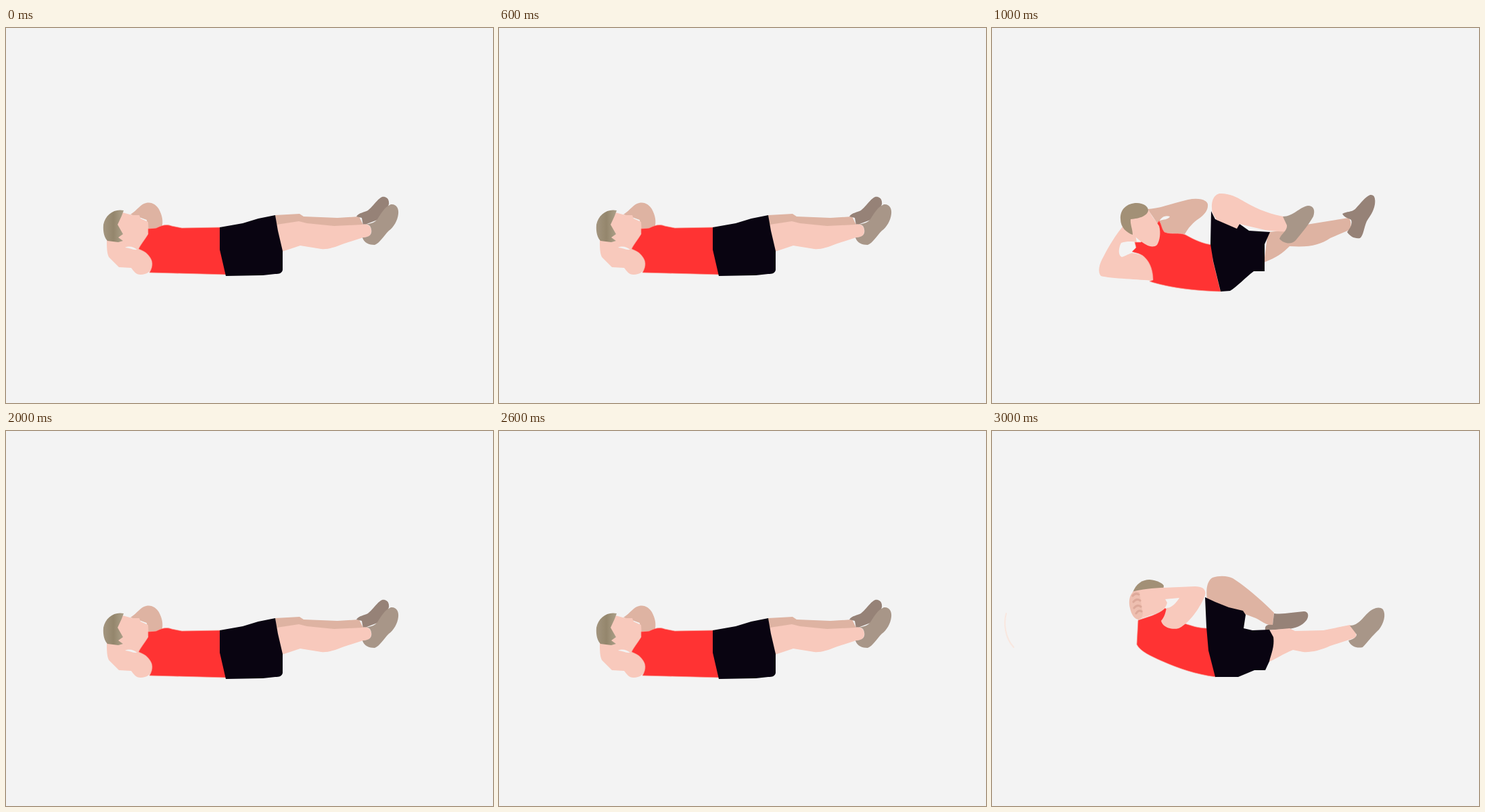
An HTML page for the animation above (4 s loop, 720x555 px).

```html
<!DOCTYPE html>
<html lang="en">
<head>
<meta charset="utf-8">
<title>Bicycle crunch</title>
<style>
  html, body { margin: 0; width: 100%; height: 100%; overflow: hidden; background: #f3f3f3; }
  svg { display: block; width: 100%; height: 100%; }
  g { display: none; }
  g.on { display: inline; }
  .skin { fill: #f8c9bc; }
  .far { fill: #deb3a2; }
  .shirt { fill: #f33; stroke: #f9a397; stroke-width: .7; }
  .shorts { fill: #090411; }
  .hair { fill: #a29076; }
  .shoe { fill: #a89688; }
  .farshoe { fill: #968277; }
  .gap { fill: #f3f3f3; }
  .line { fill: none; stroke: #dda99a; stroke-width: 3; stroke-linecap: round; }
  .trace { fill: none; stroke: #f9e7df; stroke-width: 2; stroke-linecap: round; }
</style>
</head>
<body>
<svg viewBox="0 0 720 555">
  <defs>
    <linearGradient id="fade">
      <stop offset="0" stop-color="#a3957f"/>
      <stop offset=".5" stop-color="#94866c"/>
      <stop offset="1" stop-color="#ada18a"/>
    </linearGradient>
  </defs>

  <g id="flat" class="on">
    <path class="far" d="M184 276C195 269 198 261 207 259C216 257 222 262 226 268C231 277 233 287 230 296L210 297L208 284L197 280Z"/>
    <path class="skin" d="M172 273L187 277L197 277L199 282L210 287C211 298 211 305 206 311L196 328L190 324L168 319L160 300Z"/>
    <path class="skin" d="M149 313L168 317L190 322L197 327C208 330 215 340 216 350C216 360 208 365 199 365C192 365 189 360 185 355L167 354L152 339C149 333 149 323 149 313Z"/>
    <path class="gap" d="M176 325C182 322 189 324 194 328C188 329 182 325 176 325Z"/>
    <path fill="url(#fade)" d="M174 270C160 267 147 276 144 291C143 303 146 311 150 315L166 317L173 315L166 310L173 305L165 291L171 278Z"/>
    <path class="far" d="M398 277L434 275L440 279L490 281L522 279L529 293L480 296L430 292L400 296Z"/>
    <path class="farshoe" d="M518 279C522 273 530 273 535 270C543 264 549 253 556 250C563 249 567 254 566 261C562 271 555 280 549 284L528 292L526 281Z"/>
    <path class="skin" d="M400 291L433 286L445 289L485 293L526 291C531 289 540 291 540 300C540 308 535 310 528 310L500 319C485 325 475 328 466 327L435 322L408 331Z"/>
    <path class="shoe" d="M528 291C540 290 545 288 549 283C556 272 560 265 569 261C577 260 581 267 580 275C579 285 573 295 566 300C558 308 552 319 545 321C537 321 529 318 527 310C540 310 541 303 540 298C539 291 534 290 528 291Z"/>
    <path class="shirt" d="M210 297L222 296C230 292 237 290 245 293L260 296L317 295L318 330L326 365L290 364L212 362C218 352 217 344 211 337C207 331 200 329 196 327C198 322 206 312 210 305Z"/>
    <path class="shorts" d="M316 295L350 289L373 282L398 277L402 300L409 330L409 358C408 363 404 364 398 364L380 366L325 367L316 328Z"/>
  </g>

  <g id="left">
    <path class="far" d="M230 268C245 268 265 260 290 254C305 251 318 254 319 261C320 270 313 277 306 282C297 288 290 296 285 305L253 303L241 284Z"/>
    <path class="gap" d="M248 285C251 279 258 277 263 279C260 284 254 283 249 285Z"/>
    <path class="far" d="M408 302L430 300L465 291L527 281C531 284 532 294 528 299L500 311C485 321 470 325 440 323C430 333 420 340 402 347Z"/>
    <path class="farshoe" d="M518 275C525 271 531 273 537 268C546 258 552 250 559 247C566 246 567 253 566 261C564 272 559 278 554 286C550 295 549 308 544 311C536 312 530 309 525 302C530 296 533 290 531 284C527 281 521 281 518 275Z"/>
    <path class="skin" d="M193 294C184 305 173 322 165 338C158 350 156 361 161 367C175 371 220 372 237 374C239 362 235 350 228 341C222 335 213 334 207 333C200 335 196 338 192 339C186 337 187 325 191 318C200 315 208 316 214 317L211 300Z"/>
    <path class="shirt" d="M247 285C251 290 251 298 255 302C266 306 276 302 286 306C300 314 312 319 325 321L327 345L338 390C300 389 260 384 233 375L238 373C238 355 231 343 223 337C217 333 212 333 207 331L213 325L211 317L220 317L243 291Z"/>
    <path class="skin" d="M203 282L230 268C235 275 237 280 241 284L247 293C250 303 248 315 244 321C237 327 227 321 219 315L207 305Z"/>
    <path class="hair" d="M190 283C189 268 200 259 214 259C224 259 231 264 231 270C230 278 218 282 205 283C204 290 208 298 208 306C199 303 190 295 190 283Z"/>
    <path class="shorts" d="M324 271L330 283L345 288L362 294L366 290L380 300L411 302L403 320L403 360L387 360C375 369 362 383 352 389L338 390L327 345L323 320Z"/>
    <path class="skin" d="M326 274C323 260 326 248 336 245C350 244 362 250 373 257C395 270 415 276 431 279L437 290L435 301C425 302 415 300 404 299L378 293L366 290L362 297L332 284Z"/>
    <path class="shoe" d="M430 279C445 279 455 265 467 263C476 263 478 270 475 279C467 293 458 303 450 313C444 321 432 320 425 312C427 305 437 300 436 292Z"/>
  </g>

  <g id="right">
    <path class="trace" d="M21 270C17 284 19 306 32 320"/>
    <path class="far" d="M318 249C316 234 318 222 326 217C338 213 350 215 356 218C375 230 398 250 417 269L415 288C405 287 398 281 390 277L374 271L371 267L340 262Z"/>
    <path class="farshoe" d="M417 270C430 272 445 268 461 267C468 267 469 274 465 280C458 289 448 292 438 293L404 295C403 288 406 286 415 287Z"/>
    <path class="skin" d="M408 295L440 292L448 296L490 295L529 287C535 290 541 300 537 306L500 318C485 325 470 328 460 327L445 324C430 330 420 337 409 342Z"/>
    <path class="shoe" d="M529 288C542 288 549 275 556 269C564 262 572 259 578 264C583 272 579 285 572 294C562 303 555 313 548 320C540 322 530 319 527 310C535 308 539 305 539 301Z"/>
    <path class="hair" d="M208 239C213 226 222 220 233 220C244 221 252 225 254 229L253 235L225 240Z"/>
    <path class="shirt" d="M216 280C230 275 245 272 256 262L285 285C295 288 305 292 319 292L321 325L331 364C300 360 275 351 250 340C235 333 220 327 214 316Z"/>
    <path class="skin" d="M212 237L255 247L259 254C257 263 250 268 240 271C232 273 222 277 216 279Z"/>
    <path class="skin" d="M208 238C230 231 265 232 300 230C312 230 317 235 315 243C308 262 290 286 276 292C265 295 252 290 250 281C256 274 257 266 258 262C265 262 272 255 277 247L255 249L222 249Z"/>
    <path fill="#eebfb0" d="M210 237C202 243 202 255 204 262C206 272 211 279 217 279C223 277 224 270 222 264L218 238Z"/>
    <path class="line" d="M208 244Q212 239 217 242M209 253Q214 247 219 251M210 262Q215 256 220 260M213 270Q217 264 221 267"/>
    <path class="shorts" d="M315 246L330 253L350 261L371 266L375 272L372 292L385 295L410 294L416 305C418 320 412 332 410 341L404 354L388 354L364 364L330 364L320 325L317 290Z"/>
  </g>
</svg>
<script>
  const poses = ["flat", "left", "flat", "right"];
  const groups = document.querySelectorAll("g");
  const start = performance.now();

  function draw() {
    const step = Math.floor((performance.now() - start) / 1000) % poses.length;
    for (const g of groups) g.classList.toggle("on", g.id === poses[step]);
    requestAnimationFrame(draw);
  }
  draw();
</script>
</body>
</html>
```
